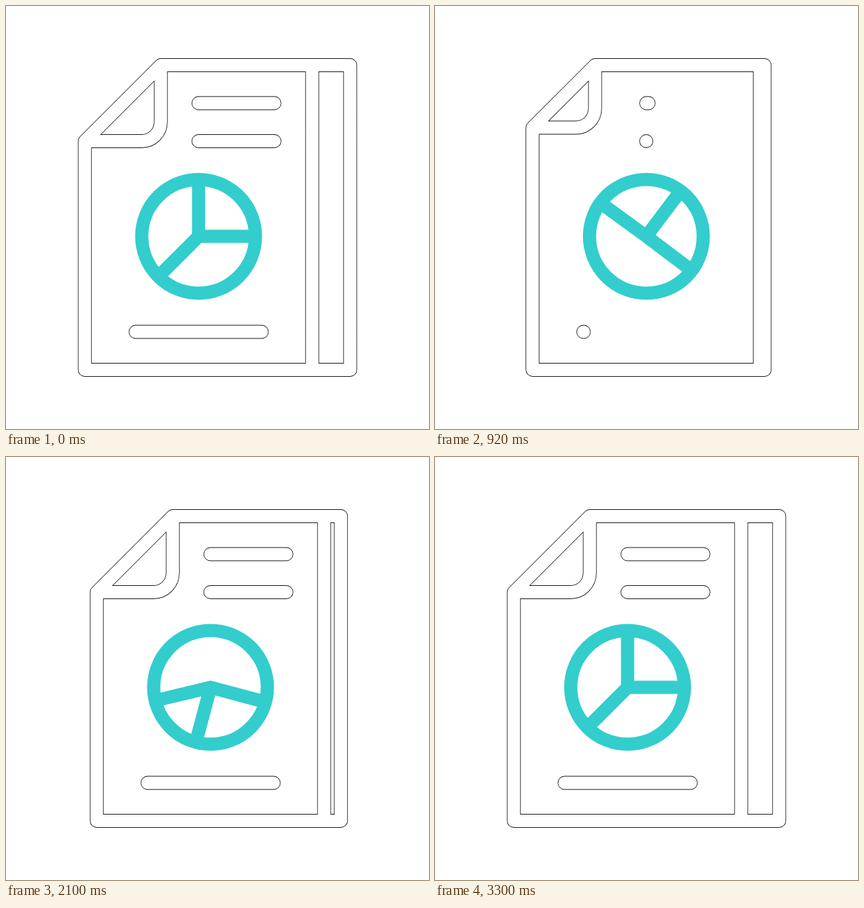
Animation, 640 px wide and 640 px high, one loop 3.6 s. Source, as an HTML page with a canvas:

```html
<!DOCTYPE html>
<html lang="en">
<head>
<meta charset="utf-8">
<title>Report</title>
<style>
html, body { margin: 0; width: 100%; height: 100%; overflow: hidden; background: #fff; }
canvas { display: block; width: 640px; height: 640px; }
</style>
</head>
<body>
<canvas id="stage" width="640" height="640"></canvas>
<script>
const LOOP = 3600;
const TEAL = '#33cdcd';
const TOP = 89.5, BOTTOM = 550.5;
const ctx = document.getElementById('stage').getContext('2d');

// x, y, length between cap centres, start and half length of the dip
const bars = [
  { x: 291.2, y: 147, len: 115, start: 403, half: 465 },
  { x: 291.2, y: 204.5, len: 115, start: 409, half: 522 },
  { x: 196, y: 493, len: 191, start: 461, half: 480 }
];

// start, duration, angle added to the right-angle pair, angle added to the third spoke
const turns = [
  [100, 790, 37, 81],
  [1410, 775, 70, -51],
  [2525, 775, -107, -30]
];

const wave = p => (1 - Math.cos(Math.PI * Math.min(1, Math.max(0, p)))) / 2;
const ease = (t, start, dur) => wave((t - start) / dur);
const dip = (t, start, half) => ease(t, start, half) - ease(t, start + half, half);

function sheetPath(t, close) {
  const left = 119.2 + close;
  const right = 463.2 + close;
  const back = 520.8 - close * 0.78;
  const fold = 24.4 * dip(t, 239, 540);
  const fx = 234.2 + close - fold;
  const fy = 204.5 - fold;
  const path = new Path2D();

  path.moveTo(left, fy);
  path.lineTo(fx, TOP);
  path.lineTo(right, TOP);
  path.lineTo(right, BOTTOM);
  path.lineTo(left, BOTTOM);
  path.closePath();

  path.moveTo(left, fy);
  path.arcTo(fx, fy, fx, TOP, 29);
  path.lineTo(fx, TOP);

  path.moveTo(right, TOP);
  path.lineTo(back, TOP);
  path.lineTo(back, BOTTOM);
  path.lineTo(right, BOTTOM);

  for (const b of bars) {
    const x = b.x + close;
    path.moveTo(x, b.y);
    path.lineTo(x + Math.max(0.01, b.len * (1 - dip(t, b.start, b.half))), b.y);
  }
  return path;
}

function drawSheet(t, close) {
  const path = sheetPath(t, close);
  ctx.lineCap = ctx.lineJoin = 'round';
  for (const [width, color] of [[20.85, '#111'], [19.15, '#fff']]) {
    ctx.lineWidth = width;
    ctx.strokeStyle = color;
    ctx.stroke(path);
  }
}

function drawChart(t, close) {
  const cx = 291.4 + close, cy = 348.5, r = 86;
  let pair = 0, third = 225;
  for (const [start, dur, a, b] of turns) {
    const k = ease(t, start, dur);
    pair += a * k;
    third += b * k;
  }
  const rim = deg => {
    const a = deg * Math.PI / 180;
    return [cx + r * Math.sin(a), cy - r * Math.cos(a)];
  };

  ctx.lineCap = 'butt';
  ctx.lineJoin = 'miter';
  ctx.lineWidth = 20;
  ctx.strokeStyle = TEAL;
  ctx.beginPath();
  ctx.arc(cx, cy, r, 0, Math.PI * 2);
  ctx.moveTo(...rim(third));
  ctx.lineTo(cx, cy);
  ctx.lineTo(...rim(pair));
  ctx.moveTo(cx, cy);
  ctx.lineTo(...rim(pair + 90));
  ctx.stroke();
}

function draw(t) {
  const close = 32.5 * (ease(t, 75, 1100) - ease(t, 1590, 1100));
  ctx.fillStyle = '#fff';
  ctx.fillRect(0, 0, 640, 640);
  drawSheet(t, close);
  drawChart(t, close);
}

function tick() {
  draw(performance.now() % LOOP);
  requestAnimationFrame(tick);
}
tick();
</script>
</body>
</html>
```
